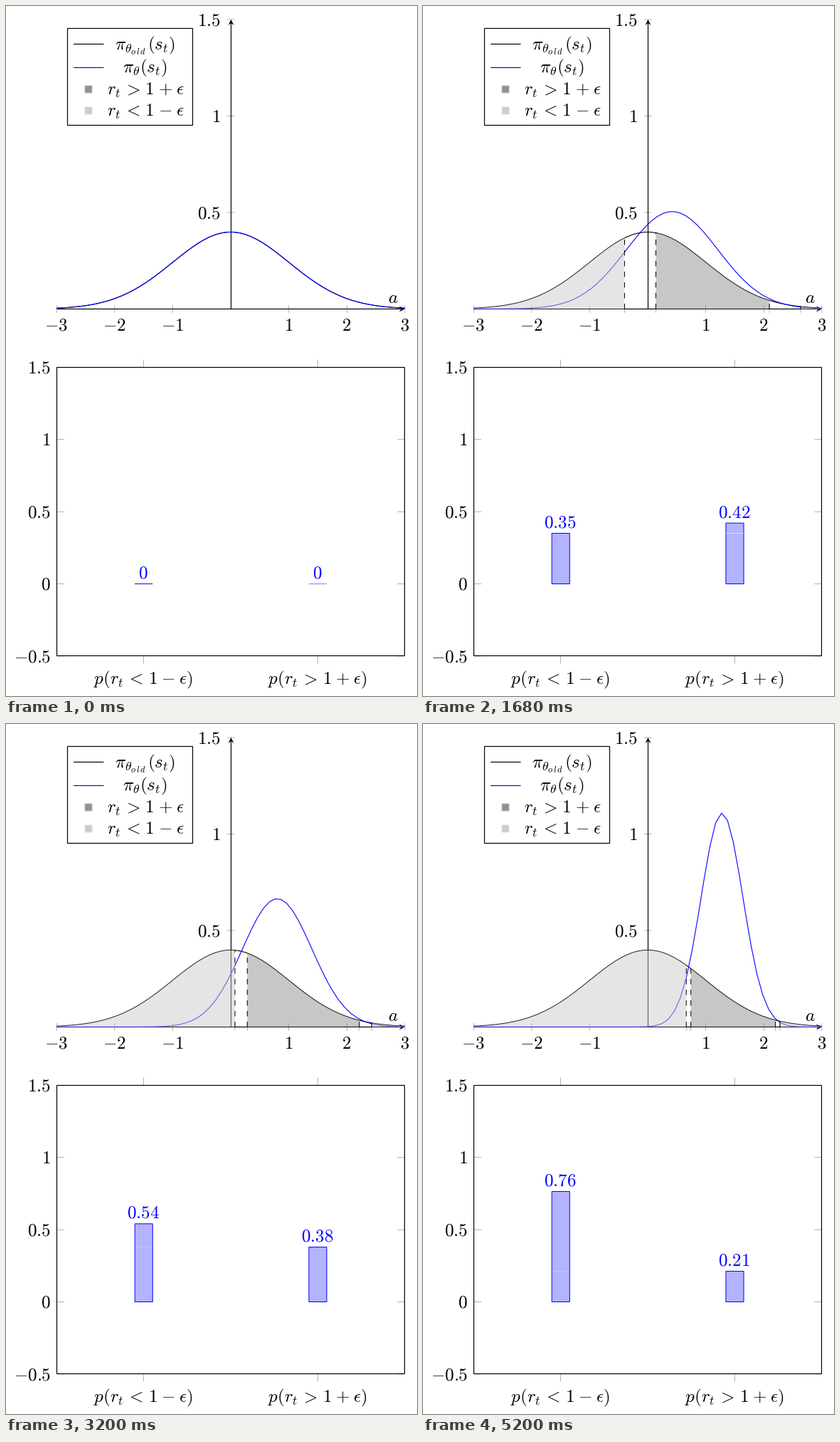
Recreate the animation shown at these times as a matplotlib script. Size 578 by 969 pixels, loop 5.28 s.

```python
import numpy as np
import matplotlib.pyplot as plt
from matplotlib.animation import FuncAnimation
from matplotlib.patches import Polygon, Rectangle

W, H, DPI = 578, 969, 64
PX = 72 / DPI                      # points per pixel
FRAMES, INTERVAL = 66, 80
EPS = 0.2
EM = 25.1 * PX
BLUE = (0, 0, 1)
GRAY = "0.5"
DARK, LIGHT = "0.57", "0.8"

plt.rcParams["mathtext.fontset"] = "cm"
plt.rcParams["lines.solid_capstyle"] = "butt"
plt.rcParams["path.snap"] = False

fig = plt.figure(figsize=(W / DPI, H / DPI), dpi=DPI, facecolor="white")
ax = fig.add_axes([0, 0, 1, 1])
ax.set_xlim(0, W)
ax.set_ylim(H, 0)
ax.axis("off")

# Plot geometry in pixels
LEFT, RIGHT = 71.3, 560.9
MID = (LEFT + RIGHT) / 2
BASE, TOP = 425.5, 19.0
BOX_TOP, BOX_BOTTOM = 507.4, 912.9
BAR_X = (193.7, 438.5)
BAR_W = 25.1
TICK = 10.7


def px(x):
    return MID + np.asarray(x) * (RIGHT - LEFT) / 6


def py(y):
    return BASE - np.asarray(y) * (BASE - TOP) / 1.5


def by(v):
    return BOX_BOTTOM - (v + 0.5) * (BOX_BOTTOM - BOX_TOP) / 2


def crisp(v):
    """Centre of the pixel that holds v."""
    return np.floor(v) + 0.5


def line(xs, ys, color="black", width=1.1, z=2, **kw):
    return ax.plot(xs, ys, color=color, lw=width * PX, zorder=z, **kw)[0]


def tick(x0, y0, x1, y1):
    return line([x0, x1], [y0, y1], GRAY, 0.6, z=1)


def label(x, y, tex, ha="center", color="black"):
    if ha == "center":
        x -= 0.7                   # side bearing of the glyphs
    return ax.text(x, y, f"${tex}$", fontsize=EM, ha=ha, va="baseline",
                   color=color, zorder=8)


def rect(x, y, w, h, z, **kw):
    return ax.add_patch(Rectangle((x, y), w, h, zorder=z, **kw))


def frame(x0, y0, x1, y1, z):
    x0, y0, x1, y1 = crisp([x0, y0, x1, y1])
    rect(x0, y0, x1 - x0, y1 - y0, z, facecolor="white" if z > 2 else "none",
         edgecolor="black", lw=1.2 * PX)


def arrow_tip(x, y, dx, dy):
    """Stealth tip at (x, y) pointing along the unit vector (dx, dy)."""
    shape = [(0, 0), (-8, 4), (-5, 0), (-8, -4)]
    pts = [(x + a * dx - b * dy, y + a * dy + b * dx) for a, b in shape]
    ax.add_patch(Polygon(pts, facecolor="black", edgecolor="none", zorder=2))


def normal(x, mu=0.0, sigma=1.0):
    return np.exp(-((x - mu) / sigma) ** 2 / 2) / (sigma * np.sqrt(2 * np.pi))


def rel(sign):
    return rf"\hspace{{0.12}}{sign}\hspace{{0.12}}"


def binary(sign):
    return rf"\hspace{{0.05}}{sign}\hspace{{0.05}}"


RATIO = r"r_t\hspace{0.05}"
ABOVE = RATIO + rel(">") + "1" + binary("+") + r"\epsilon"
BELOW = RATIO + rel("<") + "1" + binary("-") + r"\epsilon"

# Upper plot
line([LEFT, RIGHT - 5], [crisp(BASE)] * 2, width=1.2)
line([crisp(MID)] * 2, [BASE, TOP + 5], width=1.2)
arrow_tip(RIGHT, crisp(BASE), 1, 0)
arrow_tip(crisp(MID), TOP, 0, -1)
for n in (-3, -2, -1, 1, 2, 3):
    tick(px(n), BASE - TICK / 2, px(n), BASE + TICK / 2)
    label(px(n), 456, n)
for v in (0.5, 1, 1.5):
    tick(MID - TICK / 2, py(v), MID + TICK / 2, py(v))
    label(302, py(v) + 8.2, v, "right")
label(545.5, 417, "a")

# Lower plot
frame(LEFT, BOX_TOP, RIGHT, BOX_BOTTOM, 2)
for v in (-0.5, 0, 0.5, 1, 1.5):
    tick(LEFT, by(v), LEFT + TICK, by(v))
    tick(RIGHT - TICK, by(v), RIGHT, by(v))
    label(63, by(v) + 8.2, v, "right")
for x, tex in zip(BAR_X, (BELOW, ABOVE)):
    tick(x, BOX_TOP - TICK, x, BOX_TOP)
    tick(x, BOX_BOTTOM, x, BOX_BOTTOM + TICK)
    label(x, 952, f"p({tex})")

# Legend
frame(86, 31, 262, 167, 6)
OLD = r"o\hspace{0.15}l\hspace{0.15}d\hspace{0.15}"
label(196.5, 62, rf"\pi_{{\theta_{{{OLD}}}}}(s_t)")
label(196.5, 93.5, r"\pi_{\theta}(s_t)")
label(196.5, 124.4, ABOVE)
label(196.5, 154.4, BELOW)
for y, color in ((53.5, "black"), (86.5, BLUE)):
    line([95, 137.5], [y, y], color, 1.2, 7)
for y, color in ((117, DARK), (147, LIGHT)):
    rect(110.5, y - 5.5, 11, 11, 7, facecolor=color, alpha=0.6, lw=0)
    rect(111.5, y - 4.5, 9, 9, 7, facecolor=color, lw=0)

# Moving parts
GRID = np.linspace(-3, 3, 60)
SUM_GRID = np.linspace(-3, 3, 101)
STEP = 0.06
line(px(GRID), py(normal(GRID)), z=3)
curve = line(px(GRID), py(normal(GRID)), BLUE, z=4)

regions = [ax.add_patch(Polygon([(0, 0)] * 3, facecolor=c, alpha=0.5, lw=0, zorder=5))
           for c in (LIGHT, DARK, LIGHT)]
dashes = [line([], [], width=1, z=6, linestyle=(0, (7.5, 7.5))) for _ in range(4)]
marks = [line([], [], GRAY, 0.6, z=1) for _ in range(4)]

bars = [rect(x - BAR_W / 2, by(0), BAR_W, 0, 3, facecolor=(0.7, 0.7, 1),
             edgecolor=BLUE, lw=PX) for x in BAR_X]
values = [label(x, 0, "0", color=BLUE) for x in BAR_X]
seam = line([], [], "white", 1, z=4)


def crossings(mu, sigma, ratio):
    """Both x where the new density is `ratio` times the old one."""
    a = 0.5 - 0.5 / sigma ** 2
    b = mu / sigma ** 2
    c = -np.log(sigma) - 0.5 * (mu / sigma) ** 2 - np.log(ratio)
    disc = b * b - 4 * a * c
    if a == 0 or disc < 0:
        return None
    root = np.sqrt(disc)
    return (b - root) / (-2 * a), (b + root) / (-2 * a)


def area(lo, hi):
    lo, hi = np.clip([lo, hi], -3, 3)
    if lo >= hi:
        return [(0, 0)] * 3
    xs = np.concatenate([[lo], GRID[(GRID > lo) & (GRID < hi)], [hi]])
    ys = np.interp(xs, GRID, normal(GRID))
    top = list(zip(px(xs), py(ys)))
    return [(px(lo), BASE)] + top + [(px(hi), BASE)]


def mass(mask):
    return normal(SUM_GRID[mask]).sum() * STEP


def draw(i):
    k = i - (i >= 60)              # the motion pauses for one frame
    mu, sigma = 0.02 * k, 1 - 0.01 * k
    curve.set_ydata(py(normal(GRID, mu, sigma)))

    low = crossings(mu, sigma, 1 - EPS)
    high = crossings(mu, sigma, 1 + EPS)
    if low and high:
        spans = [(-3, low[0]), high, (low[1], 3)]
        edges = [low[0], *high, low[1]]
        probs = (mass((SUM_GRID < low[0]) | (SUM_GRID > low[1])),
                 mass((SUM_GRID > high[0]) & (SUM_GRID < high[1])))
    else:
        spans, edges, probs = [(0, 0)] * 3, [9] * 4, (0, 0)

    for patch, span in zip(regions, spans):
        patch.set_xy(area(*span))
    for dash, mark, x in zip(dashes, marks, edges):
        shown = abs(x) < 3
        dash.set_visible(shown)
        mark.set_visible(shown)
        dash.set_data([px(x)] * 2, [BASE, py(normal(x))])
        mark.set_data([px(x)] * 2, [BASE - TICK / 2, BASE + TICK / 2])

    for bar, text, p in zip(bars, values, probs):
        bar.set_height(by(p) - by(0))
        text.set_y(by(p) - 7.9)
        text.set_text(f"${round(p, 2):g}$")

    # Faint seam across the taller bar at the height of the other
    right = probs[1] >= probs[0]
    x = BAR_X[int(right)]
    seam.set_data([x - BAR_W / 2, x + BAR_W / 2], [by(min(probs))] * 2)
    seam.set_alpha(0.5 if right else 0.2)
    return []


anim = FuncAnimation(fig, draw, frames=FRAMES, interval=INTERVAL,
                     repeat=True, repeat_delay=0, blit=False)
plt.show()
```
